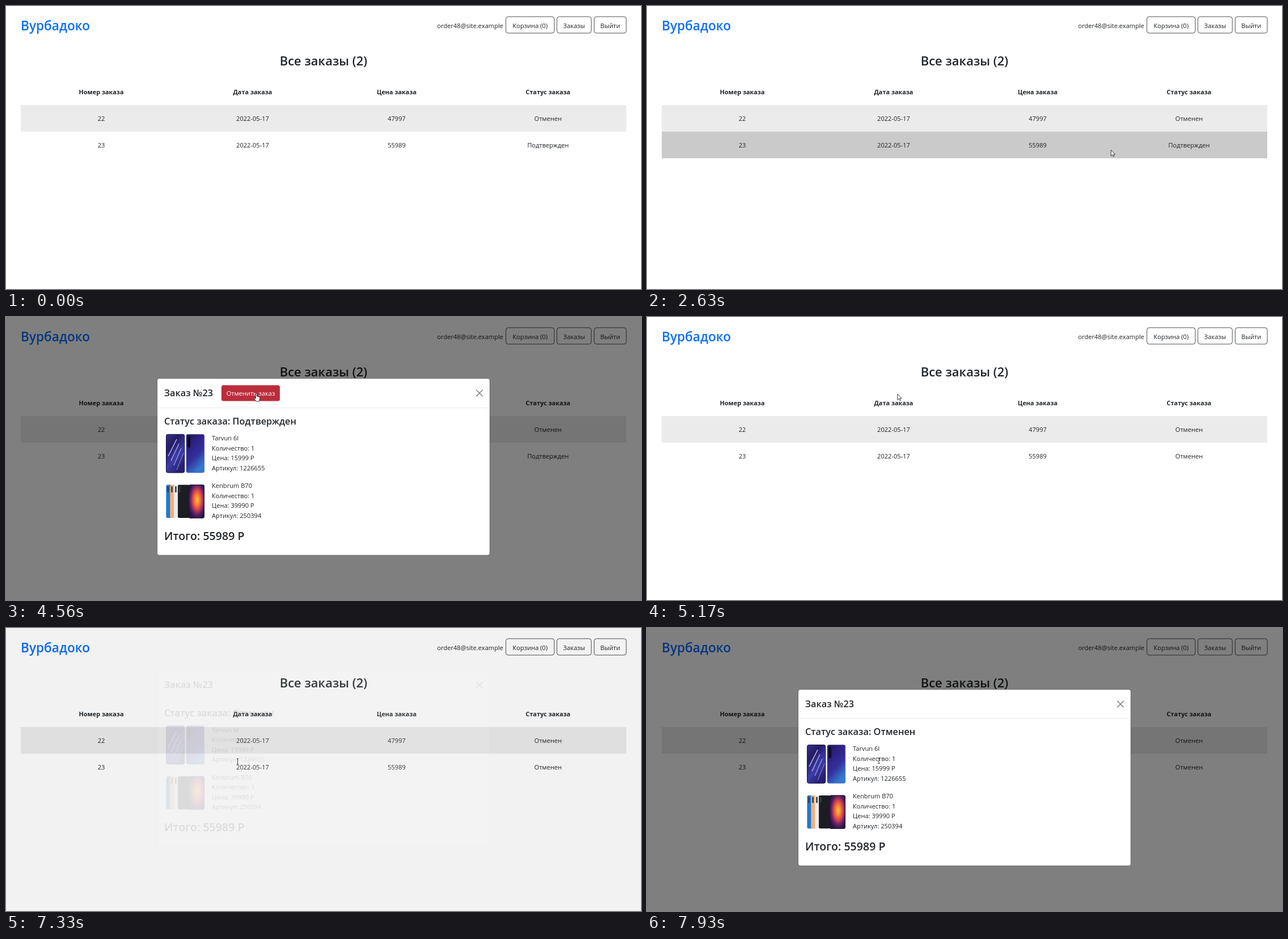
Recreate the animation shown at these times as an HTML page. Size 1120x500 px, loop 8000 ms.

```html
<!DOCTYPE html>
<html lang="ru">
<head>
<meta charset="utf-8">
<title>Заказы</title>
<style>
  html, body { margin: 0; width: 100%; height: 100%; overflow: hidden; background: #fff; }
  svg { display: block; width: 100%; height: 100%; }
  text { font: 11.1px "Open Sans", "Noto Sans", sans-serif; fill: #212529; white-space: pre; }
  .mid { text-anchor: middle; }
  .end { text-anchor: end; }
  .th { font-size: 10.9px; font-weight: 700; }
  .h2 { font-size: 22px; font-weight: 600; }
  .h3 { font-size: 19.6px; font-weight: 600; }
  .h4 { font-size: 16.3px; font-weight: 600; }
  .brand { font-size: 22.6px; fill: #0d6efd; }
  .light { fill: #fff; }
  #sheet { fill: #fff; stroke: #000; stroke-opacity: .2; stroke-width: 1.4; paint-order: stroke; }
</style>
</head>
<body>
<svg id="stage" viewBox="0 0 1120 500"></svg>
<script>
const LOOP = 8000, FRAME = 70;
const stage = document.getElementById('stage');
const label = (x, y, str, cls = '', id = '') =>
  `<text x="${x}" y="${y}" class="${cls}" id="${id}">${str}</text>`;
const box = (x, y, w, h, fill, more = '') =>
  `<rect x="${x}" y="${y}" width="${w}" height="${h}" fill="${fill}" ${more}/>`;
const gradient = (kind, id, attrs, colors) =>
  `<${kind}Gradient id="${id}" ${attrs}>` +
  colors.map((c, i) => `<stop offset="${i / (colors.length - 1)}" stop-color="${c}"/>`).join('') +
  `</${kind}Gradient>`;

// Page
const columns = [168, 435, 689, 956];
const row = (index, cells, cls = '') =>
  cells.map((c, i) => label(columns[i], 156 + 47 * index, c, 'mid ' + cls, `cell${index}${i}`)).join('');
const navButton = (x, w, str) =>
  box(x, 18.9, w, 29, 'none', 'rx="4" stroke="#212529" stroke-width=".8"') +
  label(x + w / 2, 39, str, 'mid');

const page = `
  ${label(26, 43, 'Вурбадоко', 'h2 brand')}
  ${label(877, 39, 'order48@site.example', 'end')}
  ${navButton(881.7, 85.3, 'Корзина (0)')}
  ${navButton(971.7, 60.6, 'Заказы')}
  ${navButton(1037.4, 56.6, 'Выйти')}
  ${label(560, 105, 'Все заказы (2)', 'h2 mid')}
  ${box(26, 175, 1068, 47, '#ebebeb', 'id="row1"')}
  ${box(26, 222, 1068, 47, '#fff', 'id="row2"')}
  ${row(0, ['Номер заказа', 'Дата заказа', 'Цена заказа', 'Статус заказа'], 'th')}
  ${row(1, ['22', '2022-05-17', '47997', 'Отменен'])}
  ${row(2, ['23', '2022-05-17', '55989', 'Подтвержден'])}`;

// Phones
const streaks = Array.from({ length: 4 }, (_, i) =>
  `<path d="M${286 + i * 5} ${246 + i * 8}l${15 - i}-30" stroke="#c9ccf6" stroke-width="1.6" opacity="${0.85 - i * 0.15}"/>`).join('');
const phonePair = `
  ${box(282.5, 207.3, 32.4, 67.8, 'url(#front)', 'rx="3" stroke="#1d1a3c"')}
  ${streaks}
  ${box(318, 207.3, 31.8, 67.8, 'url(#back)', 'rx="3" stroke="#4a55b4" stroke-width=".6"')}
  ${box(320.5, 211, 4.5, 20, '#0c0b1f', 'rx="2.2"')}`;

const slabs = ['#1f78cf', '#f2b078', '#e9ebef', '#1c1d22'].map((fill, i) =>
  box(282.4 + i * 6.9, 296.5, i < 3 ? 12 : 20, 58.5, fill, 'rx="2.5"') +
  box(284.4 + i * 6.9, 299, 2.6, 11, '#333a48', 'rx="1.3"')).join('');
const phoneFan = slabs + box(322, 296.6, 27.6, 58.6, 'url(#splash)', 'rx="2.5" stroke="#17141f"');

// Order window
const product = (index, name, price, code) =>
  [name, 'Количество: 1', `Цена: ${price} Р`, `Артикул: ${code}`]
    .map((s, i) => label(363, 218 + 84 * index + 17.6 * i, s)).join('');

const modal = `
  <g id="modal">
    <rect id="sheet" x="267.1" y="109.1" width="585.8" rx="3.6"/>
    ${label(279, 140, 'Заказ №23', 'h4')}
    <g id="cancel">
      ${box(380, 120.4, 103, 28.2, '#dc3545', 'id="cancelFace" rx="3.5"')}
      ${label(431.5, 139, 'Отменить заказ', 'mid light')}
    </g>
    <path d="M829.8 129.2l10.6 10.6m0-10.6l-10.6 10.6" stroke="#7f7f7f" stroke-width="1.6" stroke-linecap="round"/>
    <g id="content">
      ${box(267.4, 160.3, 585.2, 0.8, '#dee2e6')}
      ${label(279, 190, '', 'h4', 'state')}
      ${phonePair}
      ${product(0, 'Tarvun 6I', 15999, 1226655)}
      ${phoneFan}
      ${product(1, 'Kenbrum B70', 39990, 250394)}
      ${label(279, 393.5, 'Итого: 55989 Р', 'h3')}
    </g>
  </g>`;

const cursors = `
  <g id="cursor" fill="#fff" stroke="#111" stroke-width=".8" stroke-linejoin="round">
    <path id="arrow" d="M.4 .5V11L2.8 8.7 4.4 12.2 6 11.5 4.6 8.1H7.6Z"/>
    <path id="hand" d="M-1.1 1Q0-.9 1.1 1V4.6L5 5.6Q6.5 6.2 6.2 8.4L5.2 13.6H-.6L-3.6 9Q-3.8 7.2-1.1 8.6Z"/>
    <path id="beam" d="M-1.8-4.8H1.8M-1.8 4.8H1.8M0-4.8V4.8"/>
  </g>`;

stage.innerHTML = `
  <defs>
    ${gradient('linear', 'front', 'x2=".6" y2="1"', ['#3a2f8c', '#241b66', '#3d3cab', '#251f70'])}
    ${gradient('linear', 'back', 'x2=".5" y2="1"', ['#1d1650', '#2c2182', '#33309c', '#3578cc'])}
    ${gradient('radial', 'splash', 'cx=".55" cy=".45" r=".6"', ['#ffc348', '#f2882f', '#d8404e', '#5b2068', '#24153f'])}
  </defs>
  ${page}${box(0, 0, 1120, 500, '#000', 'id="backdrop"')}${modal}${cursors}`;

const el = id => document.getElementById(id);
const set = (id, name, value) => el(id).setAttribute(name, value);
const show = (id, on) => set(id, 'display', on ? 'inline' : 'none');
const write = (id, str) => { if (el(id).textContent !== str) el(id).textContent = str; };
const clamp = v => Math.min(1, Math.max(0, v));
const easeOut = u => 1 - (1 - clamp(u)) ** 1.7;

// Pointer moves: start, end, and where it arrives. A move that stays in place is a click.
const origin = [1040, 455];
const moves = [
  [520, 1150, 849, 299],
  [1540, 2030, 818, 254],
  [2560, 2910, 818, 254],
  [2980, 3330, 511, 210],
  [3400, 3680, 478, 173],
  [4080, 4560, 441.5, 135.5],
  [4890, 5240, 441.5, 135.5],
  [5830, 6180, 421, 188.5],
  [6250, 6600, 409, 230],
  [6670, 6800, 408.5, 236],
  [7330, 7670, 409, 234.5]
];

// The screen is sampled every FRAME ms while something moves, and holds still in between.
function sample(now) {
  const i = moves.findLastIndex(m => m[0] <= now);
  if (i < 0) return { t: 0, x: 0, y: 0 };
  const [start, end, x1, y1] = moves[i];
  const [x0, y0] = i ? moves[i - 1].slice(2) : origin;
  const gaps = Math.round((end - start) / FRAME);
  const gap = (end - start) / gaps;
  const n = Math.min(gaps, Math.floor((now - start) / gap + 0.001));
  const u = (n + 1) / (gaps + 1);
  return { t: start + n * gap, x: x0 + (x1 - x0) * u, y: y0 + (y1 - y0) * u };
}

const OPEN = 2672, CLOSE = 4875, REOPEN = 7315, SLIDE = 300, FADE = 150;
const presence = (t, ms, ease) =>
  ease((t - OPEN) / ms) - ease((t - CLOSE) / ms) + ease((t - REOPEN) / ms);

function draw(now) {
  const { t, x, y } = sample(now);
  const fade = presence(t, FADE, clamp);
  const shift = -36.7 * (1 - presence(t, SLIDE, easeOut));
  const cancelled = t > CLOSE + FADE / 2;
  const second = t > CLOSE + SLIDE;
  const covered = (t > 2600 && !second) || t > REOPEN;

  set('backdrop', 'opacity', fade / 2);
  set('modal', 'opacity', fade);
  set('modal', 'transform', `translate(0 ${shift})`);
  set('content', 'transform', `translate(0 ${second ? -0.8 : 0})`);
  set('sheet', 'height', second ? 310.7 : 311.5);
  show('cancel', !second);
  write('state', 'Статус заказа: ' + (second ? 'Отменен' : 'Подтвержден'));
  write('cell23', cancelled ? 'Отменен' : 'Подтвержден');

  const over1 = !covered && y >= 175 && y < 222;
  const over2 = !covered && y >= 222 && y < 269;
  const pressed = t > 2600 && t < OPEN;
  set('row1', 'fill', over1 ? '#cacaca' : '#ebebeb');
  set('row2', 'fill', over2 || pressed ? '#cacaca' : '#fff');

  const onCancel = covered && !second && x > 380 && x < 483 && y < 148.5 + shift;
  set('cancelFace', 'fill', onCancel ? '#bb2d3b' : '#dc3545');

  const onText = covered && ((x < 514 && y > 172 && y < 196) || (x < 450 && y > 200));
  const kind = over1 || over2 || onCancel ? 'hand' : onText ? 'beam' : 'arrow';
  for (const id of ['arrow', 'hand', 'beam']) show(id, t > 0 && id === kind);
  set('cursor', 'transform', `translate(${x} ${y})`);
}

const began = performance.now();
function tick() {
  draw((performance.now() - began) % LOOP);
  requestAnimationFrame(tick);
}
tick();
</script>
</body>
</html>
```
